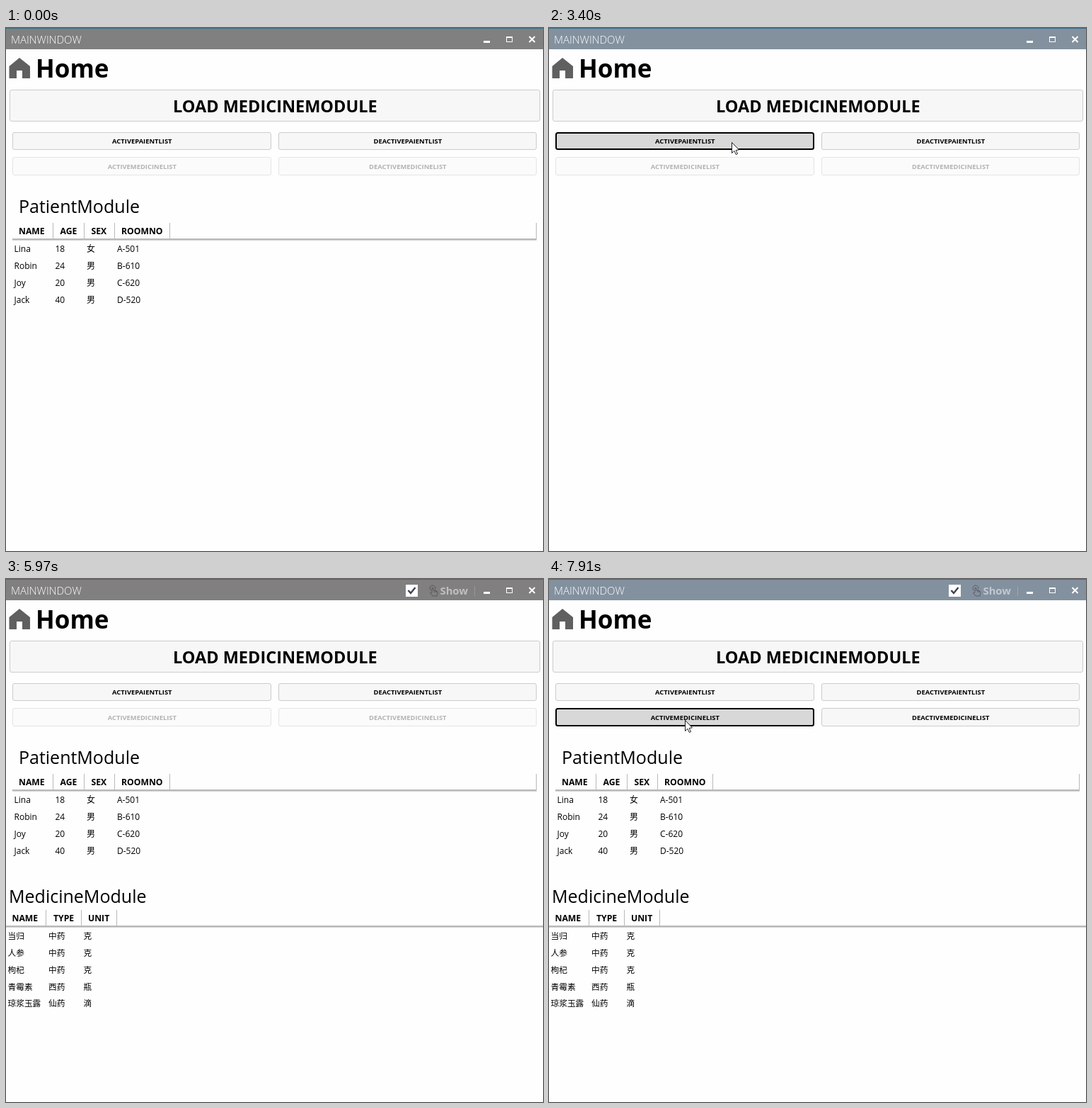
Recreate the animation shown at these times as an HTML page with a canvas. Size 759 by 738 pixels, loop 8000 ms.

```html
<!DOCTYPE html>
<html lang="en">
<head>
<meta charset="utf-8">
<title>Main window</title>
<style>
  html, body { margin: 0; width: 100%; height: 100%; overflow: hidden; background: #fefefe; }
  canvas { display: block; }
</style>
</head>
<body>
<canvas id="stage" width="759" height="738"></canvas>
<script>
const ctx = document.getElementById('stage').getContext('2d');
const LOOP = 8000;
const SANS = '"Open Sans", "Noto Sans CJK SC", "Noto Sans CJK", sans-serif';

const buttons = {
  load:   { x: 5,   y: 87,  w: 750, h: 45, size: 23.5, base: 119, label: 'LOAD MEDICINEMODULE' },
  on:     { x: 9,   y: 147, w: 366, h: 25, size: 9.4,  base: 163, label: 'ACTIVEPAIENTLIST' },
  off:    { x: 385, y: 147, w: 365, h: 25, size: 9.4,  base: 163, label: 'DEACTIVEPAIENTLIST' },
  medOn:  { x: 9,   y: 182, w: 366, h: 26, size: 9.4,  base: 199, label: 'ACTIVEMEDICINELIST' },
  medOff: { x: 385, y: 182, w: 365, h: 26, size: 9.4,  base: 199, label: 'DEACTIVEMEDICINELIST' }
};

// press: from, to, button
const presses = [
  [1060, 1380, 'on'], [2240, 2790, 'off'], [3400, 3630, 'on'],
  [4870, 5120, 'load'], [7910, 8000, 'medOn']
];
const focusChanges = [
  [0, null], [1060, 'on'], [2240, 'off'], [3400, 'on'],
  [4870, 'load'], [5120, null], [6820, 'load'], [7910, 'medOn']
];

// Pointer strokes along quadratic curves, sampled in n discrete steps
const moves = [
  { t0: 70,   t1: 680,  n: 9,  pow: 2,   enter: true, path: [[662, 724], [330, 300], [255, 148]] },
  { t0: 1380, t1: 2150, n: 11, pow: 1.3, path: [[255, 148], [370, 405], [450, 158]] },
  { t0: 2790, t1: 3180, n: 6,  pow: 1.5, path: [[450, 158], [350, 162], [258, 161]] },
  { t0: 4260, t1: 4570, n: 5,  pow: 1.5, path: [[258, 161], [275, 132], [288, 110]] },
  { t0: 5120, t1: 5900, n: 11, pow: 1.5, path: [[288, 110], [440, 240], [623, 326]] },
  { t0: 7000, t1: 7740, n: 11, pow: 4,   enter: true, path: [[739, 365], [157, 294], [192, 199]] }
];

function pointer(t) {
  if (t < 70 || (t >= 5970 && t < 7000)) return null;
  const m = moves.filter(v => v.t0 <= t).pop();
  const pos = (t - m.t0) / (m.t1 - m.t0) * (m.n - 1);
  const k = Math.min(m.n - 1, Math.floor(pos + 0.3));
  const u = m.enter ? k / (m.n - 1) : (k + 1) / m.n;
  const e = 1 - Math.pow(1 - u, m.pow);
  const [a, b, c] = m.path;
  const at = i => (1 - e) * (1 - e) * a[i] + 2 * e * (1 - e) * b[i] + e * e * c[i];
  return { x: Math.round(at(0)), y: Math.round(at(1)) };
}

function text(str, x, y, size, weight = 400, color = '#000', align = 'left') {
  ctx.font = `${weight} ${size}px ${SANS}`;
  ctx.textAlign = align;
  ctx.fillStyle = color;
  ctx.fillText(str, x, y);
}

function rect(x, y, w, h, color) {
  ctx.fillStyle = color;
  ctx.fillRect(x, y, w, h);
}

function poly(points, fill) {
  ctx.beginPath();
  points.forEach(([x, y]) => ctx.lineTo(x, y));
  ctx.closePath();
  ctx.fillStyle = fill;
  ctx.fill();
}

function line(points, color, width) {
  ctx.beginPath();
  points.forEach(([x, y]) => ctx.lineTo(x, y));
  ctx.strokeStyle = color;
  ctx.lineWidth = width;
  ctx.stroke();
}

function drawButton(b, s) {
  const lw = s.focused ? 2 : 1;
  ctx.beginPath();
  ctx.roundRect(b.x + lw / 2, b.y + lw / 2, b.w - lw, b.h - lw, 2.5);
  ctx.fillStyle = s.pressed ? '#d8d8d8' : s.hover ? '#e0e0e0' : s.enabled ? '#f7f7f7' : '#fbfbfb';
  ctx.fill();
  ctx.lineWidth = lw;
  ctx.strokeStyle = s.focused ? '#000' : s.enabled ? '#ccc' : '#e4e4e4';
  ctx.stroke();
  text(b.label, b.x + b.w / 2 + 0.3, b.base, b.size, 700, s.enabled ? '#000' : '#b3b3b3', 'center');
}

function drawHand() {
  ctx.save();
  ctx.translate(598, 8);
  ctx.strokeStyle = 'rgba(60,60,60,.55)';
  ctx.lineWidth = 1;
  ctx.beginPath();
  ctx.arc(5, 5, 4, Math.PI * 0.7, Math.PI * 2.2);
  ctx.stroke();
  line([[4, 11], [4, 4.5], [6, 4.5], [6, 8], [11, 9], [12, 11], [11, 16], [5, 16], [1.5, 11.5], [4, 11]],
    'rgba(60,60,60,.55)', 1);
  line([[8, 8.5], [8, 11]], 'rgba(60,60,60,.55)', 1);
  line([[10, 9], [10, 11]], 'rgba(60,60,60,.55)', 1);
  ctx.restore();
}

function drawTitleBar(active, loaded) {
  rect(0, 0, 759, 30, active ? '#83919f' : '#808080');
  rect(0, 0, 759, 1, '#3b6e84');
  text('MAINWINDOW', 7, 22, 15, 300, '#fff');
  if (loaded) {
    rect(565, 8, 17, 17, '#fff');
    line([[568.5, 16], [572, 20], [578.5, 12]], '#3c4050', 2.4);
    drawHand();
    text('Show', 613.5, 22, 14.8, 700, active ? '#c1c8cf' : '#bfbfbf');
    rect(662, 10, 1, 14, active ? '#9ca7b2' : '#999');
  }
  rect(675, 18, 9, 3, '#fff');
  rect(707, 12, 9, 2, '#fff');
  ctx.strokeStyle = '#fff';
  ctx.lineWidth = 1;
  ctx.strokeRect(707.5, 12.5, 8, 7);
  line([[739.5, 12], [747.5, 20]], '#fff', 2);
  line([[747.5, 12], [739.5, 20]], '#fff', 2);
}

function drawTable(o) {
  text(o.title, o.titleX, o.titleY, 25);
  o.heads.forEach((h, i) => text(h, o.headX[i], o.top + 16, 12.2, 700));
  o.rules.forEach(x => rect(x, o.top, 1, 23, '#b9b9b9'));
  rect(o.x, o.top + 22, o.w, 2.6, '#b9b9b9');
  o.rows.forEach((row, r) => row.split(' ').forEach((cell, c) =>
    text(cell, o.cellX[c], Math.round(o.top + 41 + r * 23.85), o.size)));
}

const patients = {
  title: 'PatientModule', titleX: 18, titleY: 261, top: 275, x: 9, w: 741, size: 12,
  heads: ['NAME', 'AGE', 'SEX', 'ROOMNO'], headX: [18, 76.5, 120.5, 163],
  rules: [66, 110, 153, 231, 749], cellX: [11.5, 69.5, 114, 157],
  rows: ['Lina 18 女 A-501', 'Robin 24 男 B-610', 'Joy 20 男 C-620', 'Jack 40 男 D-520']
};
const medicines = {
  title: 'MedicineModule', titleX: 4, titleY: 457, top: 467, x: 0, w: 759, size: 11.7,
  heads: ['NAME', 'TYPE', 'UNIT'], headX: [8.5, 67, 116],
  rules: [56, 106, 156], cellX: [2.5, 60, 109.5],
  rows: ['当归 中药 克', '人参 中药 克', '枸杞 中药 克', '青霉素 西药 瓶', '琼浆玉露 仙药 滴']
};

function drawPointer({ x, y }) {
  ctx.save();
  ctx.translate(x + 0.5, y + 0.5);
  poly([[0, 0], [0, 15], [3.4, 11.8], [5.8, 17], [8, 16], [5.7, 11], [10, 10.4]], '#fff');
  ctx.strokeStyle = '#1c1c28';
  ctx.lineWidth = 1;
  ctx.stroke();
  ctx.restore();
}

function render(t) {
  const modal = t >= 5120 && t < 6820;
  const loaded = t >= 5120;
  const p = pointer(t);
  const focus = focusChanges.filter(f => f[0] <= t).pop()[1];
  const press = presses.find(v => t >= v[0] && t < v[1]);

  rect(0, 0, 759, 738, '#fefefe');
  drawTitleBar(t >= 1060 && !modal, loaded);
  poly([[19, 42], [34, 54], [34, 71], [23, 71], [23, 60], [15, 60], [15, 71], [4.5, 71], [4.5, 54]], '#606060');
  text('Home', 42, 70, 35, 700);

  for (const [id, b] of Object.entries(buttons)) {
    const enabled = !id.startsWith('med') || t >= 6820;
    const inside = p && p.x >= b.x && p.x < b.x + b.w && p.y >= b.y && p.y < b.y + b.h;
    drawButton(b, {
      enabled,
      hover: enabled && inside && !modal,
      pressed: press && press[2] === id,
      focused: focus === id
    });
  }

  if (t < 2470 || t >= 3630) drawTable(patients);
  if (loaded) drawTable(medicines);
  if (p) drawPointer(p);
}

const start = performance.now();
function tick() {
  render((performance.now() - start) % LOOP);
  requestAnimationFrame(tick);
}
tick();
</script>
</body>
</html>
```
